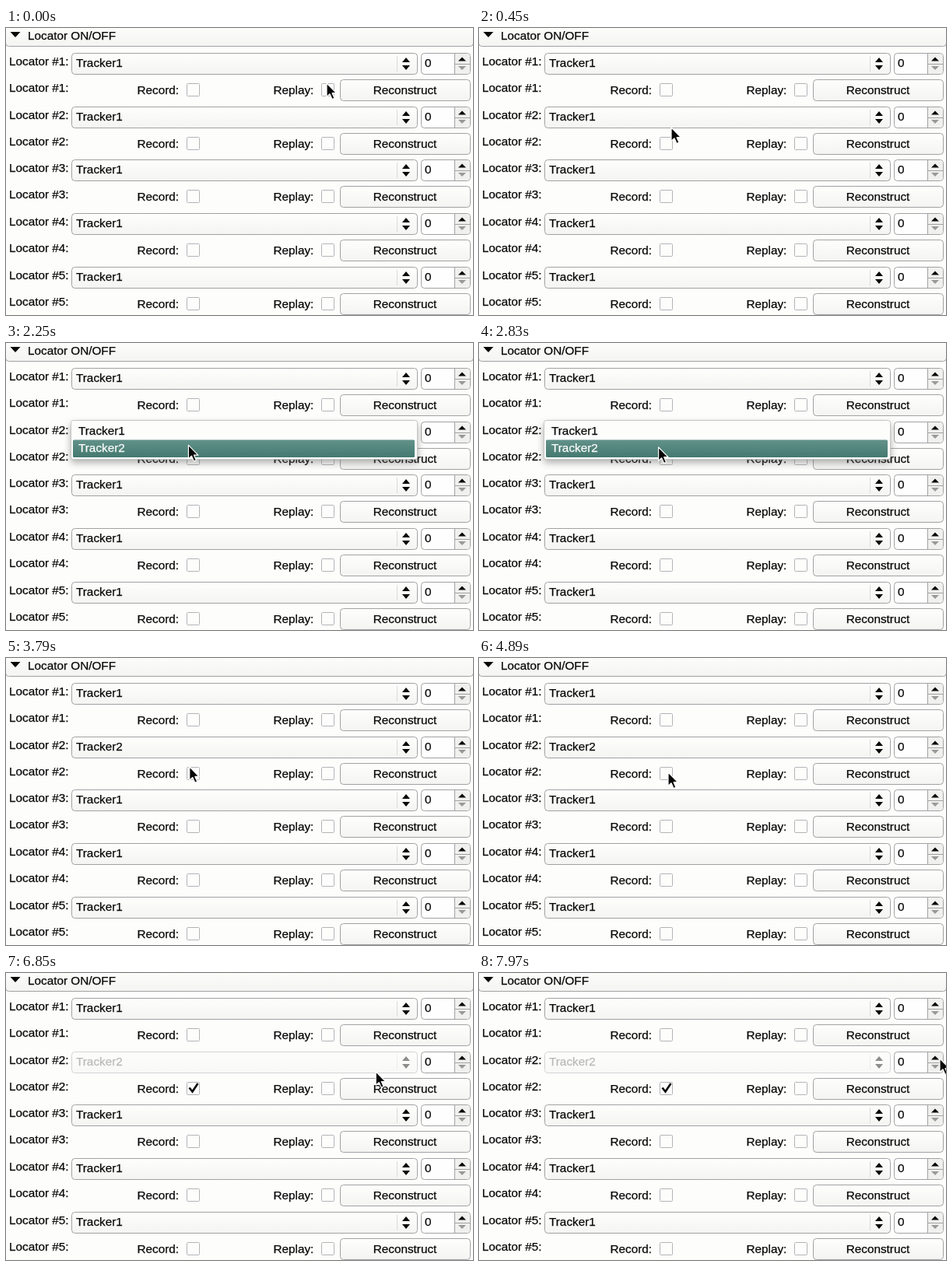
Animation of 600 by 369 pixels, one loop 7.99 s. Source, as an HTML page:

```html
<!DOCTYPE html>
<html lang="en">
<head>
<meta charset="utf-8">
<title>Locator panel</title>
<style>
html, body { margin: 0; width: 100%; height: 100%; overflow: hidden; background: #fdfdfc; }
svg { display: block; width: 100%; height: 100%; }
text { font: 15.3px "Liberation Sans", Arial, sans-serif; fill: #080808; stroke: #080808; stroke-width: .25; }
</style>
</head>
<body>
<svg id="stage" viewBox="0 0 600 369">
  <defs>
    <linearGradient id="face" x2="0" y2="1">
      <stop offset="0" stop-color="#fefefd"/>
      <stop offset="1" stop-color="#f4f4f2"/>
    </linearGradient>
    <linearGradient id="pick" x2="0" y2="1">
      <stop offset="0" stop-color="#62928a"/>
      <stop offset="1" stop-color="#447970"/>
    </linearGradient>
    <filter id="blur" x="-10%" y="-40%" width="120%" height="200%">
      <feGaussianBlur stdDeviation="5"/>
    </filter>
  </defs>
  <g id="panel"></g>
  <g id="menu"></g>
  <path id="cursor" d="M0 0V17.5L4 13.8L7 20.5L10 19.2L7.1 12.7H12.4Z"
    fill="#060606" stroke="#fdfdfc" stroke-width="1.2" stroke-linejoin="round"/>
</svg>
<script>
const LOOP = 7990, ROWS = 5, PITCH = 68.7;
const OPEN = 1250, HOVER = 2250, SELECT = 3350, CHECK = 5150;
const EDGE = '#a2a2a4', INK = '#080808', PAPER = '#fdfdfc';

// cursor waypoints: time, x, y
const PATH = [
  [0, 412, 71], [60, 411, 72], [450, 247, 128], [750, 247, 122],
  [1900, 247, 122], [2400, 231, 134], [3400, 230, 134], [4000, 238, 142],
  [4500, 243, 147], [5400, 243, 147], [6050, 307, 146], [6500, 400, 137],
  [7300, 584, 112], [7800, 592, 110], [LOOP, 592, 110]
];

const $ = id => document.getElementById(id);
const text = (x, y, s, extra = '') => `<text x="${x}" y="${y}" ${extra}>${s}</text>`;
const box = (x, y, w, h, r, fill, edge = EDGE) =>
  `<rect x="${x + .5}" y="${y + .5}" width="${w - 1}" height="${h - 1}" rx="${r}" fill="${fill}" stroke="${edge}"/>`;
const tri = (x, y, w, h, fill = INK) =>
  `<path d="M${x - w / 2} ${y}h${w}l${-w / 2} ${h}z" fill="${fill}"/>`;
const line = (d, color) => `<path d="${d}" fill="none" stroke="${color}"/>`;

function combo(y) {
  return box(84, y, 445, 28, 4, 'url(#face)')
    + line(`M502.5 ${y + 4}v20`, '#dadadc')
    + tri(514, y + 12, 10, -6) + tri(514, y + 16, 10, 6);
}

function spinner(y) {
  return box(533, y, 64, 28, 4, '#fefefe')
    + `<path d="M577 ${y + 1}h15q4 0 4 4v18q0 4 -4 4h-15z" fill="#f0f0ef"/>`
    + line(`M576.5 ${y + 1}v26M577 ${y + 14.5}h19`, EDGE)
    + tri(586, y + 10.5, 10, -5) + tri(586, y + 17, 10, 5, '#99999a')
    + text(538, y + 18, '0');
}

const checkbox = (x, y) => box(x, y, 17, 17, 1, PAPER, '#b4b4b8');

function row(i) {
  const y = Math.round(i * PITCH), name = `Locator #${i + 1}:`;
  return text(4, y + 47.5, name) + text(4, y + 81.5, name)
    + `<g id="combo${i}">${combo(y + 32)}${text(90, y + 50, 'Tracker1', `id="value${i}"`)}</g>`
    + spinner(y + 32)
    + text(168.5, y + 84.5, 'Record:') + checkbox(232, y + 71)
    + text(343.5, y + 84.5, 'Replay:') + checkbox(405, y + 71)
    + box(429, y + 66, 168, 28, 4, 'url(#face)')
    + text(512.5, y + 84.5, 'Reconstruct', 'text-anchor="middle"');
}

$('panel').innerHTML =
  box(-1, -6, 602, 30, 4, 'url(#face)') + tri(12, 5, 13, 7) + text(28, 15, 'Locator ON/OFF')
  + Array.from({ length: ROWS }, (_, i) => row(i)).join('')
  + `<path id="tick" d="M235.5 147.5L239.5 152.5L246.5 142" fill="none" stroke="${INK}" stroke-width="2.6"/>`;

$('menu').innerHTML =
  '<rect x="83" y="104" width="446" height="50" rx="4" fill="#606060" opacity=".5" filter="url(#blur)"/>'
  + box(83, 99, 446, 51, 3, PAPER, '#c4c4c4')
  + '<rect id="bar" x="86" width="439" height="22.5" rx="1.5" fill="url(#pick)"/>'
  + text(93, 118, 'Tracker1', 'id="item0"') + text(93, 140, 'Tracker2', 'id="item1"');

function cursorAt(t) {
  const k = PATH.findIndex(p => p[0] > t);
  const [t0, x0, y0] = PATH[k - 1], [t1, x1, y1] = PATH[k];
  const u = (t - t0) / (t1 - t0), e = u * u * (3 - 2 * u);
  return [x0 + (x1 - x0) * e, y0 + (y1 - y0) * e];
}

function paint(id, color) {
  $(id).style.fill = $(id).style.stroke = color;
}

function draw(t) {
  const second = t >= HOVER, checked = t >= CHECK;
  const [x, y] = cursorAt(t);
  $('cursor').setAttribute('transform', `translate(${x.toFixed(2)} ${y.toFixed(2)})`);
  $('menu').style.display = t >= OPEN && t < SELECT ? '' : 'none';
  $('bar').setAttribute('y', second ? 124.5 : 102);
  paint('item0', second ? INK : PAPER);
  paint('item1', second ? PAPER : INK);
  $('value1').textContent = t >= SELECT ? 'Tracker2' : 'Tracker1';
  $('combo1').style.opacity = checked ? .45 : 1;
  $('value1').style.opacity = checked ? .6 : 1;
  $('tick').style.display = checked ? '' : 'none';
}

const start = performance.now();
function tick() {
  draw((performance.now() - start) % LOOP);
  requestAnimationFrame(tick);
}
tick();
</script>
</body>
</html>
```
